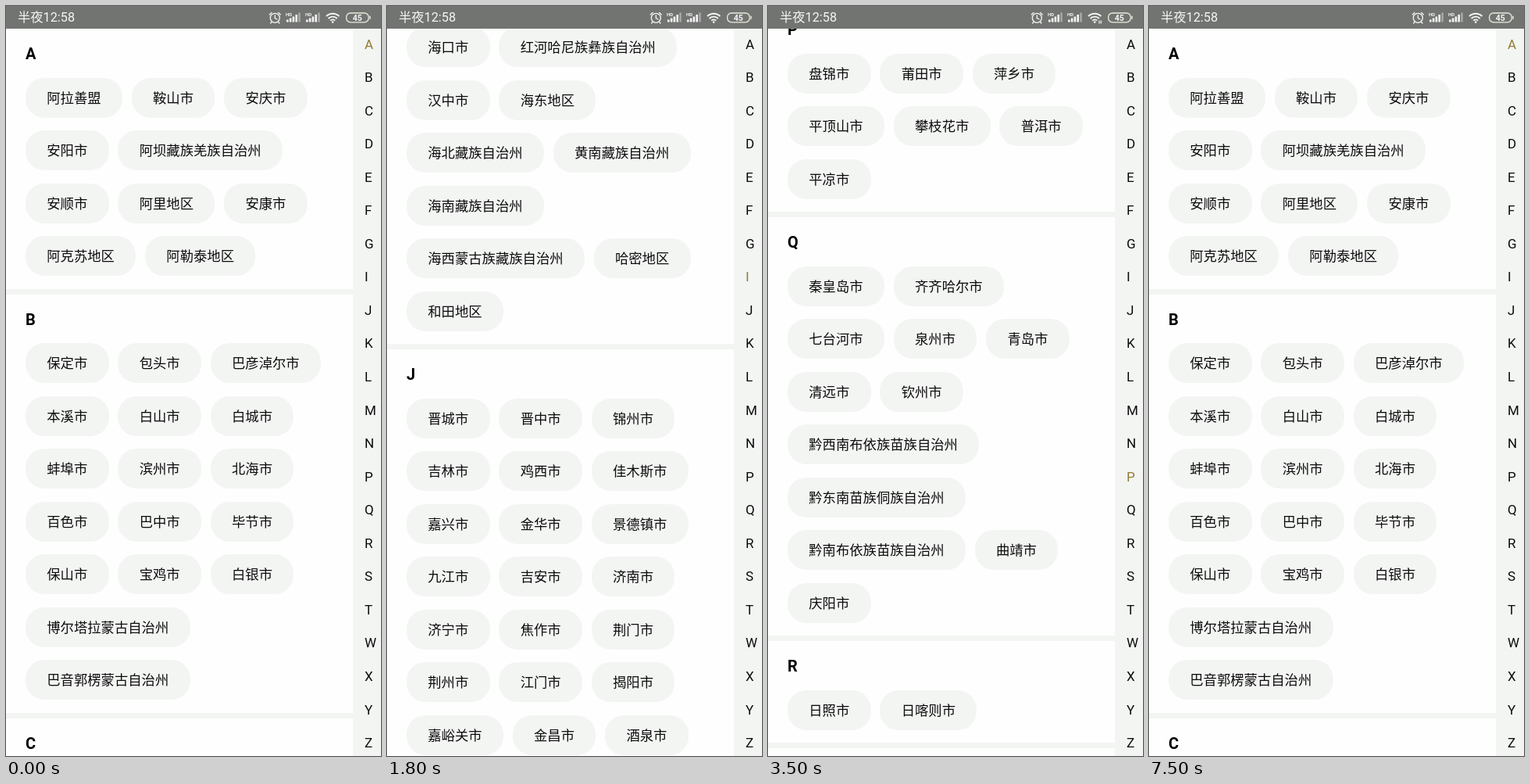
An HTML page that plays this animation: 480 by 959 pixels, repeating every 9.3 s.

```html
<!DOCTYPE html>
<html lang="zh-CN">
<head>
<meta charset="utf-8">
<title>City index</title>
<style>
html, body { margin: 0; width: 100%; height: 100%; overflow: hidden; background: #fefefe; }
body { position: relative; color: #0c0c0c; font-family: Roboto, "Noto Sans CJK SC", "Noto Sans CJK", sans-serif; }
#list { position: absolute; left: 0; top: 29px; width: 444px; will-change: transform; }
section { position: relative; box-sizing: border-box; padding: 62.5px 0 0 25px; border-bottom: 7.5px solid #f3f5f3; }
h2 { position: absolute; left: 25px; top: 20px; margin: 0; font: bold 20px/24px Roboto, sans-serif; color: #000; }
.chips { display: flex; flex-wrap: wrap; column-gap: 11.8px; width: 388px; }
.chips span { box-sizing: border-box; height: 51px; margin-bottom: 16.5px; padding: 0 27.3px; border-radius: 24px;
  background: #f3f5f3; font: 17.33px/49px "Noto Sans CJK SC", "Noto Sans CJK", sans-serif; white-space: nowrap; }
#index { position: absolute; left: 444px; top: 0; width: 36px; height: 100%; background: #f3f5f3; }
#index b { position: absolute; left: 15px; font: 17px/20px Roboto, sans-serif; }
#bar { position: absolute; left: 0; top: 0; width: 480px; height: 29px; background: #727472; }
#clock { position: absolute; left: 15px; top: 3px; font-size: 16.3px; line-height: 24px; color: #f6f6f6; white-space: nowrap; }
#bar svg { position: absolute; left: 0; top: 0; }
</style>
</head>
<body>
<div id="list"></div>
<div id="index"></div>
<div id="bar">
  <div id="clock">半夜12:58</div>
  <svg width="480" height="29" fill="none" stroke="#f4f4f4" stroke-width="1.3" stroke-linecap="round">
    <circle cx="344.3" cy="15.3" r="6"/>
    <path d="M344.3 11.8V15.6L347 17M337.3 11L340 8.5M351.3 11L348.6 8.5M340 20.5L338.7 22M348.6 20.5L349.9 22"/>
    <g id="signals" stroke="none" fill="#f4f4f4"></g>
    <g stroke-width="1.9" stroke-linecap="butt">
      <path d="M410 13.2A11.5 11.5 0 0 1 426.4 13.2M412.6 16A7.8 7.8 0 0 1 423.8 16M415.2 18.6A4.2 4.2 0 0 1 421.2 18.6"/>
      <circle cx="418.2" cy="20.6" r="1.3" fill="#f4f4f4" stroke="none"/>
    </g>
    <path id="traffic" stroke-width="1.2" stroke-linecap="butt" d="M424 18.5V22.5M426.3 18.5V22.5"/>
    <rect x="435.6" y="9" width="28.6" height="11.8" rx="5.4" stroke="#ececdc"/>
    <path d="M466 13.2V16.6" stroke="#ececdc"/>
    <text x="449.8" y="18.8" text-anchor="middle" fill="#f4f4f4" stroke="none" font-family="Roboto, sans-serif" font-size="10.5" font-weight="bold">45</text>
  </svg>
</div>
<script>
const CITIES = {
  A: '阿拉善盟 鞍山市 安庆市 安阳市 阿坝藏族羌族自治州 安顺市 阿里地区 安康市 阿克苏地区 阿勒泰地区',
  B: '保定市 包头市 巴彦淖尔市 本溪市 白山市 白城市 蚌埠市 滨州市 北海市 百色市 巴中市 毕节市 保山市 宝鸡市 白银市 博尔塔拉蒙古自治州 巴音郭楞蒙古自治州',
  C: '承德市 沧州市 长治市 赤峰市 朝阳市 长春市 常州市 滁州市 池州市 长沙市 常德市 郴州市 潮州市 崇左市 成都市 楚雄彝族自治州 昌都地区 昌吉回族自治州',
  D: '大同市 大连市 丹东市 大庆市 大兴安岭地区 东营市 德州市 东莞市 德阳市 达州市 大理白族自治州 德宏傣族景颇族自治州 迪庆藏族自治州 定西市',
  E: '鄂尔多斯市 鄂州市 恩施土家族苗族自治州',
  F: '抚顺市 阜新市 阜阳市 福州市 抚州市 佛山市 防城港市',
  G: '赣州市 孝感市 广州市 桂林市 贵港市 广元市 广安市 甘孜藏族自治州 贵阳市 甘南藏族自治州 果洛藏族自治州 固原市',
  I: '邯郸市 衡水市 呼和浩特市 呼伦贝尔市 葫芦岛市 哈尔滨市 鹤岗市 黑河市 淮安市 杭州市 湖州市 合肥市 淮南市 淮北市 黄山市 菏泽市 鹤壁市 漯河市 黄石市 黄冈市 衡阳市 怀化市 惠州市 河源市 贺州市 河池市 海口市 红河哈尼族彝族自治州 汉中市 海东地区 海北藏族自治州 黄南藏族自治州 海南藏族自治州 海西蒙古族藏族自治州 哈密地区 和田地区',
  J: '晋城市 晋中市 锦州市 吉林市 鸡西市 佳木斯市 嘉兴市 金华市 景德镇市 九江市 吉安市 济南市 济宁市 焦作市 荆门市 荆州市 江门市 揭阳市 嘉峪关市 金昌市 酒泉市',
  K: '开封市 昆明市 克拉玛依市 克孜勒苏柯尔克孜自治州 喀什地区',
  L: '廊坊市 临汾市 吕梁市 辽阳市 辽源市 连云港市 丽水市 六安市 龙岩市 临沂市 聊城市 洛阳市 娄底市 柳州市 来宾市 乐山市 凉山彝族自治州 六盘水市 丽江市 临沧市 拉萨市 林芝市 兰州市 临夏回族自治州',
  M: '牡丹江市 马鞍山市 茂名市 绵阳市',
  N: '南京市 南通市 宁波市 南平市 宁德市 南昌市 南阳市 南宁市 内江市 南充市 怒江傈僳族自治州 那曲地区',
  P: '盘锦市 莆田市 萍乡市 平顶山市 攀枝花市 普洱市 平凉市',
  Q: '秦皇岛市 齐齐哈尔市 七台河市 泉州市 青岛市 清远市 钦州市 黔西南布依族苗族自治州 黔东南苗族侗族自治州 黔南布依族苗族自治州 曲靖市 庆阳市',
  R: '日照市 日喀则市'
};
const LOOP = 9300, STEP = 100, LAG = 150;
const INK = '#0c0c0c', GOLD = '#937c36', PRESSED = '#bcbebc';
const $ = id => document.getElementById(id);

$('list').innerHTML = Object.entries(CITIES).map(([name, cities]) =>
  `<section><h2>${name}</h2><div class="chips">` +
  cities.split(' ').map(c => `<span>${c}</span>`).join('') + '</div></section>').join('');

const letters = {};
[...'ABCDEFGIJKLMNPQRSTWXYZ'].forEach((name, i) => {
  const b = letters[name] = document.createElement('b');
  b.textContent = name;
  b.style.top = 38.5 + i * 42.55 + 'px';
  $('index').append(b);
});

$('signals').innerHTML = [358, 383].map(x =>
  [3, 5, 7, 9.5, 12].map((h, i) =>
    `<rect x="${x + 1 + i * 3.8}" y="${20.5 - h}" width="2.6" height="${h}" opacity="${i < 4 ? 1 : 0.4}"/>`).join('') +
  `<text x="${x}" y="13" font-family="Roboto, sans-serif" font-size="6" font-weight="bold">HD</text>`).join('');

const names = Object.keys(CITIES);
const start = {};
const listTop = $('list').getBoundingClientRect().top;
document.querySelectorAll('section').forEach((s, i) => {
  start[names[i]] = s.getBoundingClientRect().top - listTop;
});

// Flings: time, position, speed in px per ms
const flings = [
  [50, 0, 0],
  [1400, start.G + 95.5, 2.2],
  [2300, start.L + 40, 2],
  [3500, start.P + 30.5, 0]
];
// Index taps: press time, scroll start, scroll end, letter
const taps = [
  [3800, 3700, 4300, 'G'],
  [5800, 5900, 6300, 'D'],
  [6800, 6900, 7500, 'A']
];

function flingAt(t) {
  if (t <= flings[0][0]) return 0;
  for (let i = 1; i < flings.length; i++) {
    const [t0, p0, v0] = flings[i - 1], [t1, p1, v1] = flings[i];
    if (t > t1) continue;
    const d = t1 - t0, u = (t - t0) / d, w = 1 - u;
    return p0 + (p1 - p0) * u * u * (3 - 2 * u) + v0 * d * u * w * w - v1 * d * u * u * w;
  }
  return flings[flings.length - 1][1];
}

function scrollAt(t) {
  let y = flingAt(t);
  for (const [, from, to, name] of taps) {
    if (t <= from) break;
    const u = Math.min(1, (t - from) / (to - from));
    y += (start[name] - y) * (1 - Math.pow(1 - u, 3.7));
  }
  return y;
}

function draw(t) {
  $('list').style.transform = `translateY(${-Math.round(scrollAt(t))}px)`;
  const seen = flingAt(t - LAG) + 0.5;
  let active = names.filter(n => start[n] <= seen).pop();
  let pressed = '';
  for (const [down, from, , name] of taps) {
    const settled = from + 300;
    if (t >= settled) active = name;
    else if (t >= down) pressed = name;
  }
  for (const n in letters)
    letters[n].style.color = n === active ? GOLD : n === pressed ? PRESSED : INK;
  $('traffic').style.visibility = t >= 2100 && t < 5300 ? 'visible' : 'hidden';
}

const begin = performance.now();
function tick() {
  const t = (performance.now() - begin) % LOOP;
  draw(Math.floor(t / STEP) * STEP);
  requestAnimationFrame(tick);
}
tick();
</script>
</body>
</html>
```
